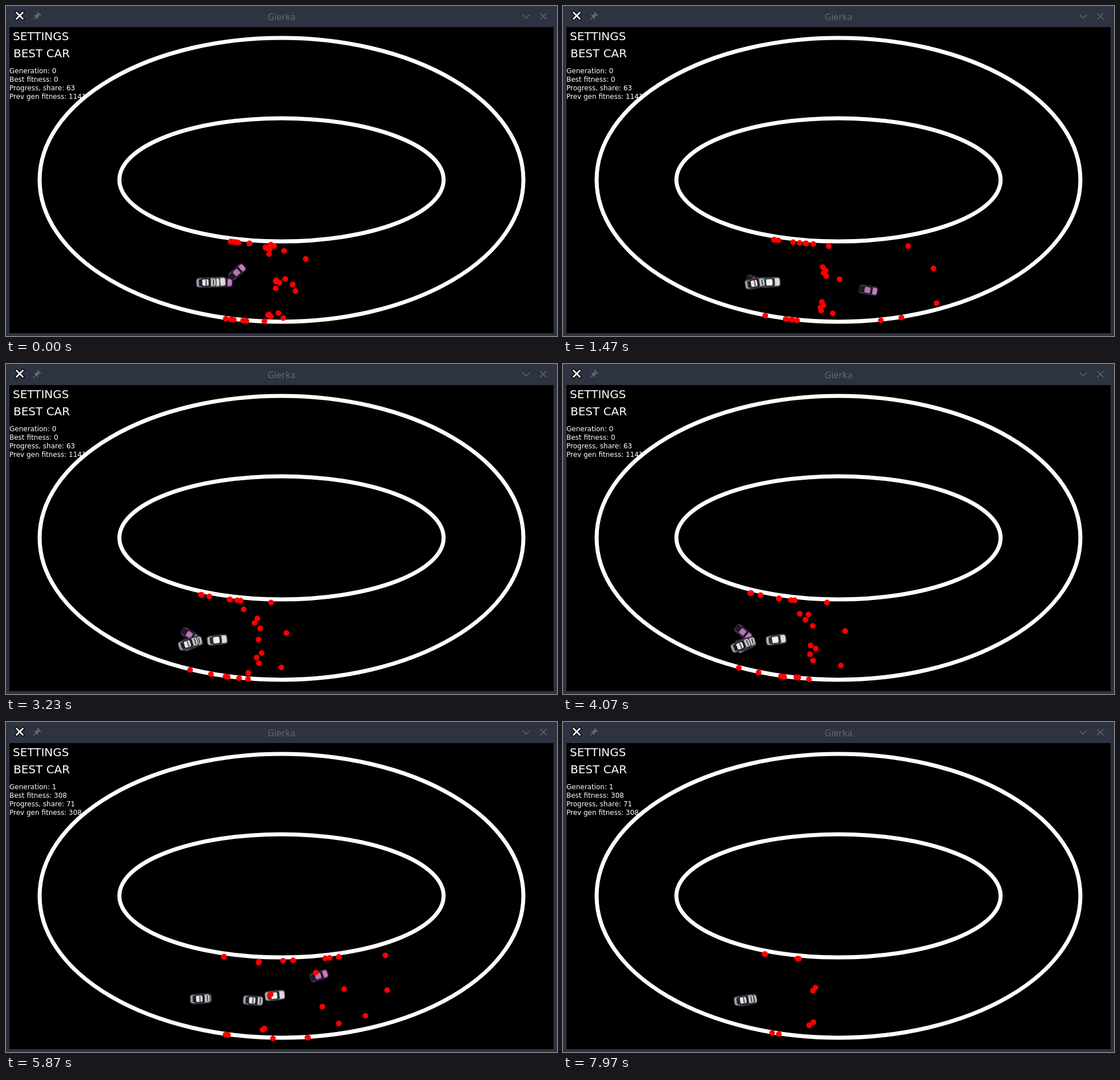
Animation, 967 px wide and 579 px high, one loop 8000 ms. Source, as an HTML page with a canvas:

```html
<!DOCTYPE html>
<html lang="en">
<head>
<meta charset="utf-8">
<title>Gierka</title>
<style>
  html, body { margin: 0; width: 100%; height: 100%; overflow: hidden; background: #000; }
  canvas { display: block; }
</style>
</head>
<body>
<canvas id="stage" width="967" height="579"></canvas>
<script>
const ctx = document.getElementById('stage').getContext('2d');
const LOOP = 8, RAD = Math.PI / 180;
const CX = 483.5, CY = 305;
const SPAWN = { x: 356, y: 485 }, TOP_SPEED = 235;

const SKINS = {
  police: { body: '#9c9ea2', hood: '#c6c6c6', glass: '#1e2026', roof: '#e6e6e4', edge: '#2e2f38' },
  white: { body: '#b4b4b8', hood: '#dcdcda', glass: '#2a2b32', roof: '#f2f2f0', edge: '#3c3c44' },
  pink: { body: '#7d4f7e', hood: '#c47fbe', glass: '#1d1924', roof: '#b873b4', edge: '#2c2030' }
};

// speed and accel in px/s; heading = turn * age + bend * age², in degrees.
const car = (skin, speed, turn, { accel = 0, bend = 0, life = Infinity } = {}) =>
  ({ skin, speed, turn, accel, bend, life });

const generations = [
  {
    born: -0.45, end: 4.48, info: [0, 0, 63, 1141],
    cars: [
      car('pink', 44, 0.5, { accel: 52, bend: 2.4, life: 2.5 }),
      car('pink', 120, -90, { life: 0.8 }),
      car('pink', -9.5, 8.7),
      car('white', 27, -8, { life: 1 }),
      car('police', -8, -6),
      car('police', -8, -3.4),
      car('white', 4, -1.8),
      car('police', -10, -5)
    ]
  },
  {
    born: 4.48, end: LOOP, info: [1, 308, 71, 308],
    cars: [
      car('pink', 118, -22, { accel: 35, bend: 6.5, life: 2.1 }),
      car('police', 10.6, 3, { accel: 65, life: 3 }),
      car('white', 0, 2.6, { accel: 120, bend: -5.1, life: 3.4 }),
      car('police', -9.5, -3.3),
      car('police', -11, -2.5)
    ]
  }
];

// Drives a car from the spawn point to its place at the given age.
function drive(c, age) {
  const steps = 60, dt = age / steps;
  const headingAt = a => c.turn * a + c.bend * a * a;
  let { x, y } = SPAWN;
  for (let i = 0; i < steps; i++) {
    const a = (i + 0.5) * dt, h = headingAt(a) * RAD;
    const dist = Math.min(c.speed + c.accel * a, TOP_SPEED) * dt;
    x += Math.cos(h) * dist;
    y += Math.sin(h) * dist;
  }
  return { x, y, heading: headingAt(age), skin: c.skin };
}

const inEllipse = (x, y, rx, ry) => ((x - CX) / rx) ** 2 + ((y - CY) / ry) ** 2 < 1;
const onTrack = (x, y) => inEllipse(x, y, 425, 250) && !inEllipse(x, y, 295, 114);

// A sensor sits just ahead of the car's middle; the outer two reach less far.
function sense(p, side) {
  const h = p.heading * RAD, angle = h + side * RAD;
  const range = Math.abs(side) > 30 ? 104 : 118;
  const x = p.x + 4 * Math.cos(h) - 2 * Math.sin(h);
  const y = p.y + 4 * Math.sin(h) + 2 * Math.cos(h);
  const at = r => [x + r * Math.cos(angle), y + r * Math.sin(angle)];
  let r = 0;
  while (r < range && onTrack(...at(r))) r += 0.5;
  return at(r);
}

function rect(color, x, y, w, h, r = 0) {
  ctx.fillStyle = color;
  ctx.beginPath();
  ctx.roundRect(x, y, w, h, r);
  ctx.fill();
}

function line(color, width, ...points) {
  ctx.strokeStyle = color;
  ctx.lineWidth = width;
  ctx.beginPath();
  points.forEach(([x, y]) => ctx.lineTo(x, y));
  ctx.stroke();
}

function cross(color, width, x, y, r) {
  line(color, width, [x - r, y - r], [x + r, y + r]);
  line(color, width, [x + r, y - r], [x - r, y + r]);
}

function text(str, x, y, font, color = '#fff') {
  ctx.font = font;
  ctx.fillStyle = color;
  ctx.fillText(str, x, y);
}

function drawCar(p) {
  const s = SKINS[p.skin];
  ctx.save();
  ctx.translate(p.x, p.y);
  ctx.rotate(p.heading * RAD);
  if (p.skin === 'pink') ctx.scale(0.93, 0.93);
  rect(s.edge, -18, -9, 36, 18, 5);
  rect(s.body, -17, -7, 34, 14, 4);
  rect(s.hood, 8, -6, 8, 12, 3);
  rect(s.glass, -13, -6, 5, 12, 2);
  rect(s.glass, -9, -7, 17, 14, 2);
  rect(s.roof, -7, -5.5, 11, 11, 2);
  if (p.skin === 'pink') rect(s.glass, -17, -6, 8, 12, 2);
  if (p.skin === 'police') {
    rect('#c8403a', -1.5, -5, 2.5, 5);
    rect('#3a56b8', -1.5, 0, 2.5, 5);
    rect(s.glass, 12, -5, 1.5, 10);
  }
  ctx.restore();
}

function drawWindow() {
  const gray = '#626970';
  rect('#2d3340', 0, 0, 967, 579);
  rect('#000', 6, 37, 955, 537);
  ctx.lineCap = 'round';
  cross('#08080c', 6, 24, 17, 5.5);
  cross('#fcfcfc', 2.8, 24, 17, 5.5);
  ctx.lineCap = 'butt';
  line(gray, 1.5, [48, 24], [53, 19]);
  line(gray, 2, [50, 16], [56, 22]);
  line(gray, 5, [53, 19], [57, 15]);
  line(gray, 2, [55, 11], [61, 17]);
  line(gray, 1.4, [906.5, 15], [913, 21.5], [919.5, 15]);
  cross(gray, 1.4, 943, 18, 5.5);
  ctx.textAlign = 'center';
  text('Gierka', 483.5, 25, '16px "Noto Sans", sans-serif', gray);
  ctx.textAlign = 'left';
}

function drawTrack() {
  ctx.strokeStyle = '#fff';
  ctx.lineWidth = 7;
  for (const [rx, ry] of [[424.5, 249], [284.5, 108]]) {
    ctx.beginPath();
    ctx.ellipse(CX, CY, rx, ry, 0, 0, 2 * Math.PI);
    ctx.stroke();
  }
}

function drawInfo([gen, best, share, prev]) {
  const big = '20px "DejaVu Sans", sans-serif', small = '12px "DejaVu Sans", sans-serif';
  text('SETTINGS', 12, 60, big);
  text('BEST CAR', 13, 90, big);
  [`Generation: ${gen}`, `Best fitness: ${best}`, `Progress, share: ${share}`, `Prev gen fitness: ${prev}`]
    .forEach((row, i) => text(row, 6, 118 + 15 * i, small));
}

function draw(t) {
  const gen = generations.find(g => t < g.end);
  const age = t - gen.born;
  const active = gen.cars.filter(c => age < c.life).map(c => drive(c, age));
  drawWindow();
  drawTrack();
  drawInfo(gen.info);
  active.forEach(drawCar);
  ctx.fillStyle = '#f00';
  for (const p of active) {
    for (let side = -60; side <= 60; side += 30) {
      ctx.beginPath();
      ctx.arc(...sense(p, side), 5, 0, 2 * Math.PI);
      ctx.fill();
    }
  }
}

const start = performance.now();
function tick() {
  draw((performance.now() - start) / 1000 % LOOP);
  requestAnimationFrame(tick);
}
tick();
</script>
</body>
</html>
```
